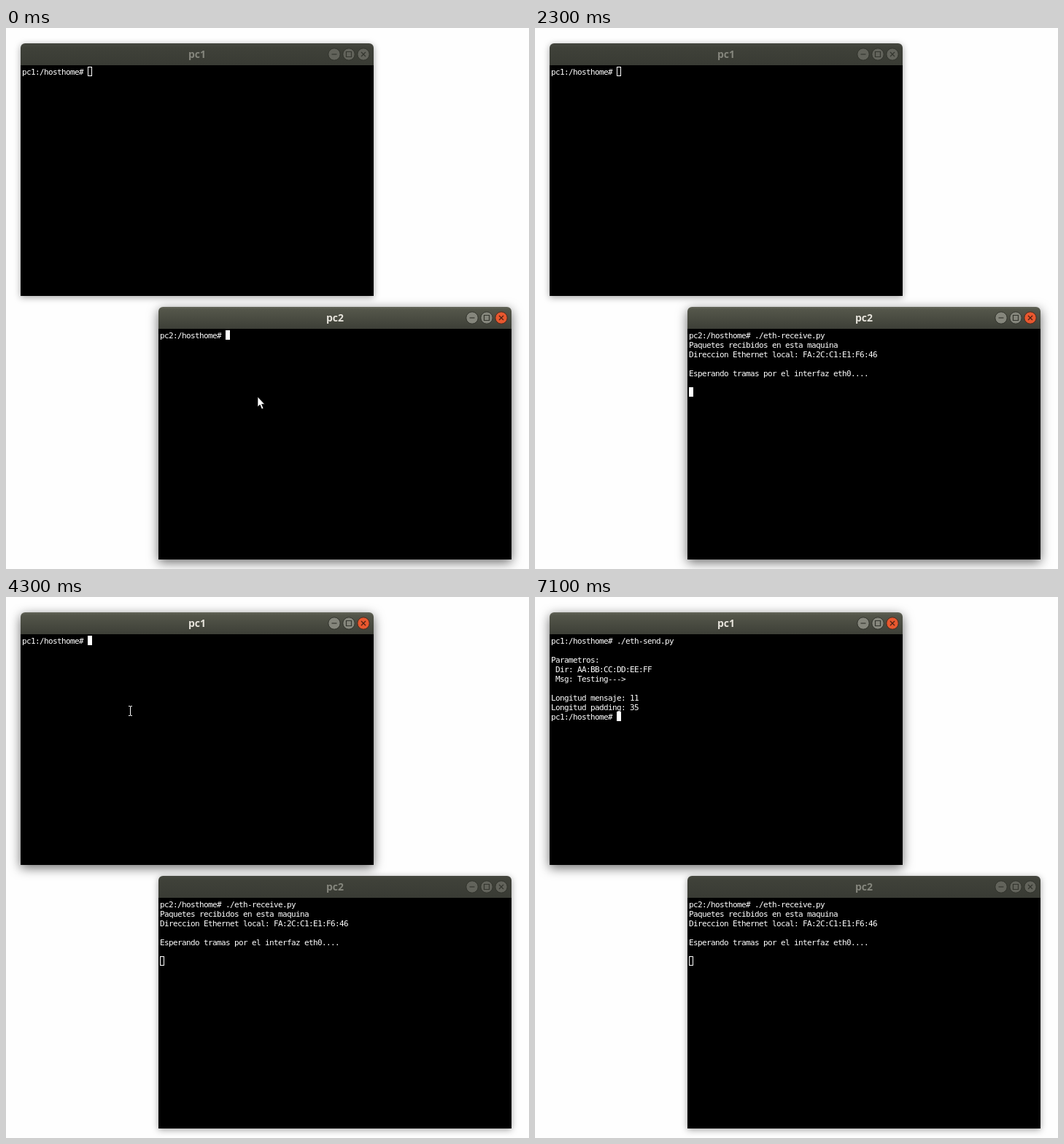
An HTML page for the animation above (8000 ms loop, 717 by 741 pixels).

```html
<!DOCTYPE html>
<html lang="es">
<head>
<meta charset="utf-8">
<title>Two terminals</title>
<style>
html, body { margin: 0; width: 100%; height: 100%; overflow: hidden; background: #fefefe; }
#stage { position: relative; width: 717px; height: 741px; overflow: hidden; }
.win {
  position: absolute; width: 484px; height: 346px; border-radius: 6px 6px 0 0;
  box-shadow: 0 2px 10px rgba(0,0,0,.36);
}
.win.raised { box-shadow: 0 4px 15px rgba(0,0,0,.58); }
.bar {
  height: 30px; border-radius: 6px 6px 0 0; position: relative;
  background: linear-gradient(#45473f, #3f4139 20%, #393b34);
  font: bold 14px/30px "Open Sans", "Noto Sans", sans-serif;
  text-align: center; color: #85867d;
}
.lit .bar { background: linear-gradient(#64665a, #54564a 12%, #3d3f37); color: #e6e3db; }
.bar svg { position: absolute; left: 420px; top: 5px; }
.bar circle { fill: #62635b; stroke: #31332c; }
.bar path { fill: none; stroke: #34362f; stroke-width: 1.2; }
.lit .bar circle { fill: #85867c; }
.lit .bar .close { fill: #e8582f; stroke: #4a2a1e; }
.lit .bar .close + path { stroke: #4a1f12; }
.term { position: relative; height: 316px; background: #000; overflow: hidden; }
pre {
  position: absolute; left: 2px; top: 3px; margin: 0; color: #fff;
  font: 11px/13px "DejaVu Sans Mono", monospace;
  letter-spacing: calc(6px - 1ch); font-variant-ligatures: none;
}
.caret { position: absolute; width: 6px; height: 13px; box-sizing: border-box; border: 1px solid #fff; }
.raised .caret { background: #fff; }
.mouse { position: absolute; left: 0; top: 0; overflow: visible; }
</style>
</head>
<body>
<div id="stage"></div>
<script>
const LOOP = 8000;
const stage = document.getElementById('stage');

function makeWindow(title, x, y) {
  const el = document.createElement('div');
  el.className = 'win';
  el.style.left = x + 'px';
  el.style.top = y + 'px';
  el.innerHTML = `
    <div class="bar">${title}
      <svg width="60" height="20">
        <circle cx="10" cy="10" r="8.2"/><path d="M6.5 10h7"/>
        <circle cx="30" cy="10" r="8.2"/><path d="M26.5 6.5h7v7h-7z"/>
        <circle class="close" cx="50" cy="10" r="8.2"/><path d="M47 7l6 6m0-6l-6 6"/>
      </svg>
    </div>
    <div class="term"><pre></pre><div class="caret"></div></div>`;
  stage.append(el);
  return { el, pre: el.querySelector('pre'), caret: el.querySelector('.caret') };
}

function makeMouse(shape) {
  const holder = document.createElement('div');
  holder.innerHTML = `<svg class="mouse" width="12" height="20">${shape}</svg>`;
  return stage.appendChild(holder.firstChild);
}

const pc1 = makeWindow('pc1', 20, 21);
const pc2 = makeWindow('pc2', 209, 382);
const mice = {
  arrow: makeMouse('<path d="M0 0V14L3.2 11.1 5.6 17 8 16 5.6 10.3H9.6Z" fill="#fff" stroke="#000" stroke-width=".7"/>'),
  beam: makeMouse('<path d="M0 .5H2L2.5 1 3 .5H5M2.5 1V13M0 13.5H2L2.5 13 3 13.5H5" fill="none" stroke="#fff"/>')
};

const ask1 = 'pc1:/hosthome# ';
const ask2 = 'pc2:/hosthome# ';
const send = ask1 + './eth-send.py';
const receive = ask2 + './eth-receive.py';
const heading = receive + '\nPaquetes recibidos en esta maquina\n';
const report = [
  send, '', 'Parametros:', ' Dir: AA:BB:CC:DD:EE:FF', ' Msg: Testing--->', '',
  'Longitud mensaje: 11', 'Longitud padding: 35', ask1
].join('\n');

// Each track lists [start in ms, value].
const text1 = [[0, ask1], [5200, ask1 + 'clear'], [5700, send], [6900, send + '\n'], [7100, report]];
const text2 = [
  [0, ask2], [400, ask2 + 'clear'], [800, receive + ' '], [2000, receive + '\n'], [2200, heading],
  [2300, heading + 'Direccion Ethernet local: FA:2C:C1:E1:F6:46\n\nEsperando tramas por el interfaz eth0....\n\n']
];
const focus = [[0, pc2], [4100, pc1]];
const litBar = [[0, pc2], [4300, pc1]];
const mouse = [
  [0, ['arrow', 345, 505]], [200, ['beam', 344, 499]], [400, ['none']],
  [3500, ['arrow', 272, 380]], [3600, ['beam', 213, 246]],
  [3800, ['beam', 176, 164]], [3900, ['beam', 168, 149]], [5200, ['none']]
];

const at = (track, t) => track.findLast(([start]) => start <= t)[1];

function write(win, text) {
  if (win.pre.textContent !== text) win.pre.textContent = text;
  const lines = text.split('\n');
  win.caret.style.left = 2 + 6 * lines.at(-1).length + 'px';
  win.caret.style.top = 2 + 13 * (lines.length - 1) + 'px';
}

function draw(t) {
  write(pc1, at(text1, t));
  write(pc2, at(text2, t));
  for (const win of [pc1, pc2]) {
    win.el.classList.toggle('raised', at(focus, t) === win);
    win.el.classList.toggle('lit', at(litBar, t) === win);
  }
  const [kind, x, y] = at(mouse, t);
  for (const name in mice) {
    const shown = name === kind;
    mice[name].style.display = shown ? 'block' : 'none';
    if (shown) mice[name].style.transform = `translate(${x}px, ${y}px)`;
  }
}

const begin = performance.now();
function tick() {
  draw((performance.now() - begin) % LOOP);
  requestAnimationFrame(tick);
}
tick();
</script>
</body>
</html>
```
